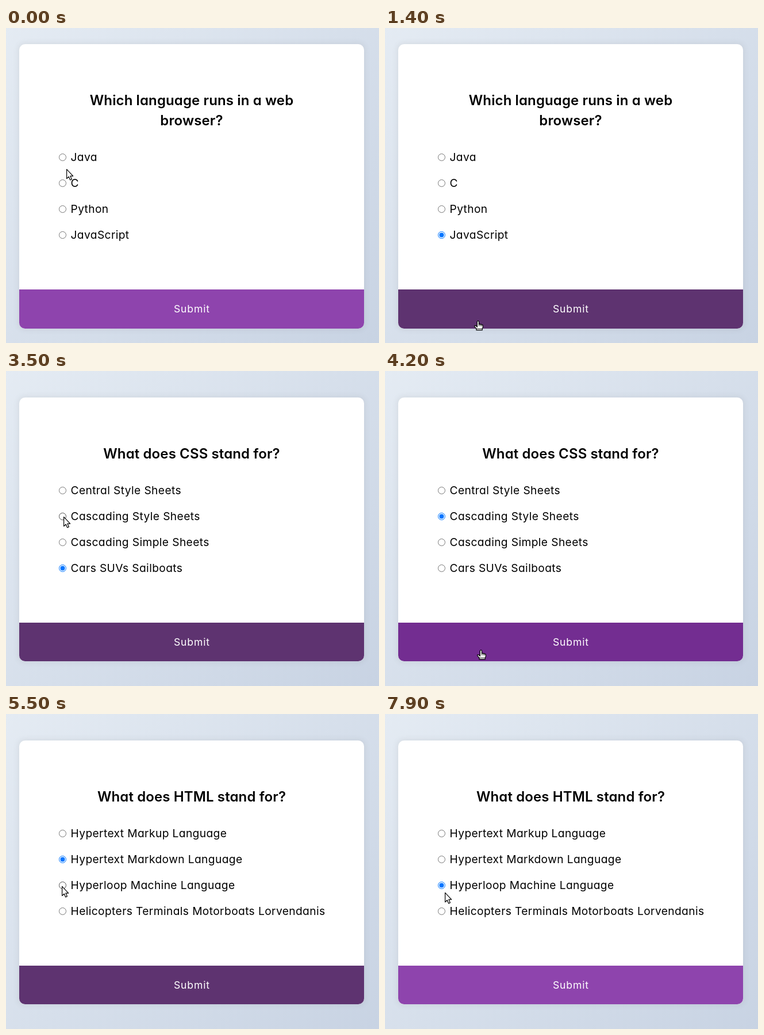
Recreate the animation shown at these times as an HTML page. Size 649 by 547 pixels, loop 8000 ms.

```html
<!DOCTYPE html>
<html lang="en">
<head>
<meta charset="utf-8">
<title>Quiz</title>
<style>
  html, body { margin: 0; width: 100%; height: 100%; overflow: hidden; }
  body { position: relative; background: linear-gradient(135deg, #e4ebf3, #c8d3e3); }
  .card {
    position: absolute; left: 23px; width: 600px; border-radius: 10px;
    overflow: hidden; background: #fff; box-shadow: 0 0 10px 2px rgba(100, 100, 100, .1);
  }
  .button { position: absolute; left: 0; right: 0; bottom: 0; }
  svg { position: absolute; left: 0; top: 0; }
  text {
    font-family: Inter, "Open Sans", sans-serif; font-size: 19.2px; letter-spacing: .38px;
    font-feature-settings: "cv11"; font-optical-sizing: none;
  }
  .title { font-size: 24px; font-weight: 600; letter-spacing: .12px; text-anchor: middle; }
  .submit { font-size: 17.6px; letter-spacing: .85px; text-anchor: middle; fill: #fff; }
  .ring { fill: #fff; stroke: #767676; }
  .dot { fill: #0075ff; display: none; }
  .over .ring { stroke: #4f4f4f; }
  .on .ring { stroke: #0075ff; }
  .on .dot { display: inline; }
  .on.over .ring { stroke: #005cc8; }
  .on.over .dot { fill: #005cc8; }
  .cursor path { fill: #fff; stroke: #000; stroke-width: 1.2; stroke-linejoin: round; }
  .cursor .crease { fill: none; stroke-width: .9; }
</style>
</head>
<body>
<div class="card"><div class="button"></div></div>
<svg width="649" height="547">
  <g id="quiz"></g>
  <g class="cursor" id="arrow">
    <path d="M.6 .4V16.6L4.2 13.2L6.7 18.9L9.4 17.7L6.9 12.1H11.7Z"/>
  </g>
  <g class="cursor" id="hand">
    <path d="M-1.6 9V1.2a1.5 1.5 0 0 1 3 0V5.6q1.3-1.2 2.5 .2q1.4-.8 2.3 .5q2-.3 2.1 1.7V11L7.2 13.2V15.7H-3V13.2L-6.2 9.4q-.5-1.6 1.2-1.8q1.4 .2 3.4 2.6Z"/>
    <path class="crease" d="M1.4 5.6V8.6M3.9 6V8.8M6.2 6.6V9M-3 13.2H7.2"/>
  </g>
</svg>
<script>
const LOOP = 8000, STEP = 100;
const LINE = 35, ROW = 45, RADIO_X = 98.5, MIDDLE = 323;
const NORMAL = '#8e44ad', HOVER = '#732d91', FOCUS = '#5e3370';

const questions = [
  { title: ['Which language runs in a web', 'browser?'],
    options: ['Java', 'C', 'Python', 'JavaScript'] },
  { title: ['What does CSS stand for?'],
    options: ['Central Style Sheets', 'Cascading Style Sheets', 'Cascading Simple Sheets', 'Cars SUVs Sailboats'] },
  { title: ['What does HTML stand for?'],
    options: ['Hypertext Markup Language', 'Hypertext Markdown Language', 'Hyperloop Machine Language',
      'Helicopters Terminals Motorboats Lorvendanis'] }
];

// The card stays centred and grows with its title
for (const q of questions) {
  const extra = q.title.length - 1;
  q.height = 458 + 36 * extra;
  q.top = 275 - q.height / 2;
  q.bottom = q.top + q.height;
  q.firstRow = q.top + 161.5 + LINE * extra;
  q.bar = q.firstRow + 229.5;
}

// The pointer rests between moves
const home = [105, 245];
const moves = [
  { from: 200, to: 600, end: [100, 362] },
  { from: 900, to: 1400, end: [162, 509] },
  { from: 1500, to: 1800, end: [168, 469] },
  { from: 2100, to: 2700, end: [66, 270] },
  { from: 2700, to: 2900, end: [104, 253] },
  { from: 3400, to: 3500, end: [100, 253] },
  { from: 3700, to: 4200, end: [167, 485] },
  { from: 4300, to: 4500, end: [168, 471] },
  { from: 4500, to: 5400, end: [97, 299] },
  { from: 5700, to: 5900, end: [100, 304] },
  { from: 7200, to: 7400, end: [99, 299] },
  { from: 7500, to: 7900, end: [104, 310] }
];
const clicks = [700, 1400, 3700, 4300, 7000, 7500];

const find = id => document.getElementById(id);
const card = document.querySelector('.card');
const button = document.querySelector('.button');
const quiz = find('quiz'), arrow = find('arrow'), hand = find('hand');
let shown = null, radios = [];

function add(parent, tag, attrs, label = '') {
  const node = document.createElementNS('http://www.w3.org/2000/svg', tag);
  for (const key in attrs) node.setAttribute(key, attrs[key]);
  node.textContent = label;
  return parent.appendChild(node);
}

function showQuestion(q) {
  shown = q;
  quiz.replaceChildren();
  card.style.top = q.top + 'px';
  card.style.height = q.height + 'px';
  button.style.height = q.bottom - q.bar + 'px';
  q.title.forEach((line, i) =>
    add(quiz, 'text', { class: 'title', x: MIDDLE, y: q.top + 106 + i * LINE }, line));
  radios = q.options.map((label, i) => {
    const y = q.firstRow + i * ROW;
    const radio = add(quiz, 'g', {});
    add(radio, 'circle', { class: 'ring', cx: RADIO_X, cy: y, r: 6 });
    add(radio, 'circle', { class: 'dot', cx: RADIO_X, cy: y, r: 4 });
    add(quiz, 'text', { x: 112.5, y: y + 6.5 }, label);
    return radio;
  });
  add(quiz, 'text', { class: 'submit', x: MIDDLE + .4, y: q.bar + 40 }, 'Submit');
}

function pointer(t) {
  let [x, y] = home;
  for (const { from, to, end } of moves) {
    if (t <= from) break;
    const k = Math.min(1, (t - from) / (to - from));
    const ease = k * k * (3 - 2 * k);
    x += (end[0] - x) * ease;
    y += (end[1] - y) * ease;
  }
  return [Math.round(x), Math.round(y)];
}

const onButton = (q, [, y]) => y >= q.bar && y < q.bottom;
const radioAt = (q, [x, y]) =>
  q.options.findIndex((_, i) => Math.hypot(x - RADIO_X, y - q.firstRow - i * ROW) < 6.5);

// Replays the clicks up to t; a submit turns the page one step later
function stateAt(t) {
  let page = 0, pick = -1, focused = false;
  for (const time of clicks.filter(c => c <= t)) {
    const q = questions[page], spot = pointer(time);
    focused = onButton(q, spot);
    if (focused && t > time) page++;
    const hit = radioAt(q, spot);
    if (hit >= 0) pick = hit;
  }
  return { q: questions[page], pick, focused };
}

function draw(t) {
  const { q, pick, focused } = stateAt(t);
  if (q !== shown) showQuestion(q);

  const spot = pointer(t), pointing = onButton(q, spot), hovered = radioAt(q, spot);
  button.style.background = focused ? FOCUS : pointing ? HOVER : NORMAL;
  radios.forEach((radio, i) => {
    radio.classList.toggle('on', i === pick);
    radio.classList.toggle('over', i === hovered);
  });

  arrow.style.display = pointing ? 'none' : '';
  hand.style.display = pointing ? '' : 'none';
  (pointing ? hand : arrow).setAttribute('transform', `translate(${spot})`);
}

const start = performance.now();
function tick() {
  const t = (performance.now() - start) % LOOP;
  draw(Math.floor(t / STEP) * STEP);
  requestAnimationFrame(tick);
}
tick();
</script>
</body>
</html>
```
